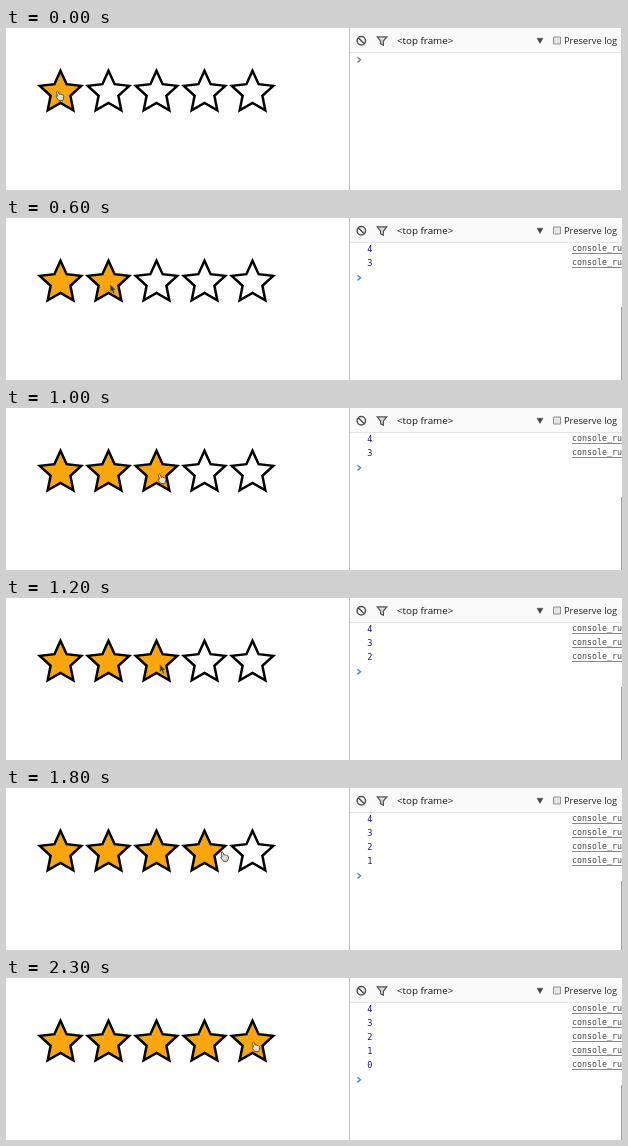
Animation of 616x162 px, one loop 2400 ms. Source, as an HTML page with a canvas:

```html
<!DOCTYPE html>
<html lang="en">
<head>
<meta charset="utf-8">
<title>Star rating with console</title>
<style>
  html, body { margin: 0; width: 100%; height: 100%; overflow: hidden; background: #fff; }
  canvas { display: block; }
</style>
</head>
<body>
<canvas id="stage" width="616" height="162"></canvas>
<script>
const ctx = document.getElementById('stage').getContext('2d');
const LOOP = 2400, STEP = 100;
const SANS = '"Open Sans", sans-serif', MONO = '"DejaVu Sans Mono", monospace';

// Pointer path: time, x, y
const path = [
  [0, 54, 68], [100, 54, 68], [300, 97, 69], [400, 106, 71], [600, 107, 71],
  [700, 108, 71], [1000, 156, 71], [1300, 157, 71], [1600, 203, 69],
  [1700, 203, 69], [2000, 250, 68], [2200, 250, 69], [LOOP, 250, 69]
];
const logTimes = [100, 600, 1100, 1700, 2200];
const arrowSpans = [[600, 700], [1100, 1200], [1600, 1700]];

const hand = new Path2D('M-3.6 -4.2Q-2.4 -5.6 -1.5 -4L-.7 -1.7Q.4 -2.5 1 -1.5Q2 -2 2.5 -1Q3.8 -1.2 3.8 .4L3.3 3.2L2.6 4.6H-1.2L-3.8 1.2Q-4.2 -.2 -2.6 .2Z');
const arrow = new Path2D('M-2.8 -4.5L-2.8 3L-1.1 1.6L.3 4.6L1.7 3.9L.4 1.1H2.8Z');

const star = new Path2D();
for (let i = 0; i < 10; i++) {
  const r = i % 2 ? 10.4 : 21.8, a = i * Math.PI / 5;
  star.lineTo(r * Math.sin(a), -r * Math.cos(a));
}
star.closePath();

function pointerAt(t) {
  const i = path.findIndex(p => p[0] > t);
  const [t0, x0, y0] = path[i - 1], [t1, x1, y1] = path[i];
  const k = (t - t0) / (t1 - t0);
  return [x0 + (x1 - x0) * k, y0 + (y1 - y0) * k];
}

function rect(x, y, w, h, color) {
  ctx.fillStyle = color;
  ctx.fillRect(x, y, w, h);
}

function text(str, x, y, font, color) {
  ctx.font = font;
  ctx.fillStyle = color;
  ctx.fillText(str, x, y);
}

function shape(p, x, y, fill, stroke, width) {
  ctx.save();
  ctx.translate(x, y);
  ctx.fillStyle = fill;
  ctx.strokeStyle = stroke;
  ctx.lineWidth = width;
  ctx.fill(p);
  ctx.stroke(p);
  ctx.restore();
}

function drawToolbar() {
  rect(344, 0, 272, 24, '#fafafa');
  rect(344, 24, 272, 1, '#e4e4e4');
  rect(343, 0, 1, 162, '#c2c2c2');
  shape(new Path2D('M4.2 0A4.2 4.2 0 1 1 -4.2 0A4.2 4.2 0 1 1 4.2 0M-2.9 -2.9L2.9 2.9'), 355.3, 12.8, 'transparent', '#555', 1.5);
  shape(new Path2D('M-4.8 -4H4.8L1.4 .2V4.4L-1.4 3V.2Z'), 376, 12.8, '#ddd', '#555', 1.2);
  text('<top frame>', 391, 16, '9.8px ' + SANS, '#111');
  shape(new Path2D('M-3 -2.6H3L0 2.8Z'), 534, 12.8, '#444', '#444', .4);
  shape(new Path2D('M-3.5 -3.5H3.5V3.5H-3.5Z'), 551, 12.5, '#e6e6e6', '#909090', 1);
  text('Preserve log', 558, 16, '9.3px ' + SANS, '#222');
}

function drawConsole(t) {
  const count = logTimes.filter(at => t >= at).length;
  for (let i = 0; i < count; i++) {
    const y = 34 + i * 14;
    text(4 - i, 361.3, y, '8.6px ' + MONO, '#1c1580');
    text('console_runner', 566, y - 1, '8.3px ' + MONO, '#444');
    rect(566, y + 1, 50, 1, '#888');
  }
  shape(new Path2D('M-1.6 -2.6L1.5 0L-1.6 2.6'), 353, 31.8 + count * 14,
    'transparent', count ? '#4a82e4' : '#777c88', 1.4);
  const top = t < 100 ? 0 : t < 1300 ? 89 : t < 2200 ? 93 : 107;
  rect(615, top, 1, 162 - top, t < 100 ? '#dfc6a4' : '#da9650');
}

function draw(t) {
  const [x, y] = pointerAt(t);
  const rating = Math.floor((x - 30.5) / 48) + 1;
  rect(0, 0, 616, 162, '#fff');
  for (let i = 0; i < 5; i++) {
    shape(star, 54.5 + i * 48, 64.6, i < rating ? '#f9a60d' : '#fff', '#000', 2.5);
  }
  if (arrowSpans.some(([a, b]) => t >= a && t <= b)) shape(arrow, x, y, '#333', '#998', .6);
  else shape(hand, x, y, '#e4ddd0', '#444', .9);
  drawToolbar();
  drawConsole(t);
}

const start = performance.now();
function tick() {
  const t = (performance.now() - start) % LOOP;
  draw(Math.floor(t / STEP) * STEP);
  requestAnimationFrame(tick);
}
tick();
</script>
</body>
</html>
```
